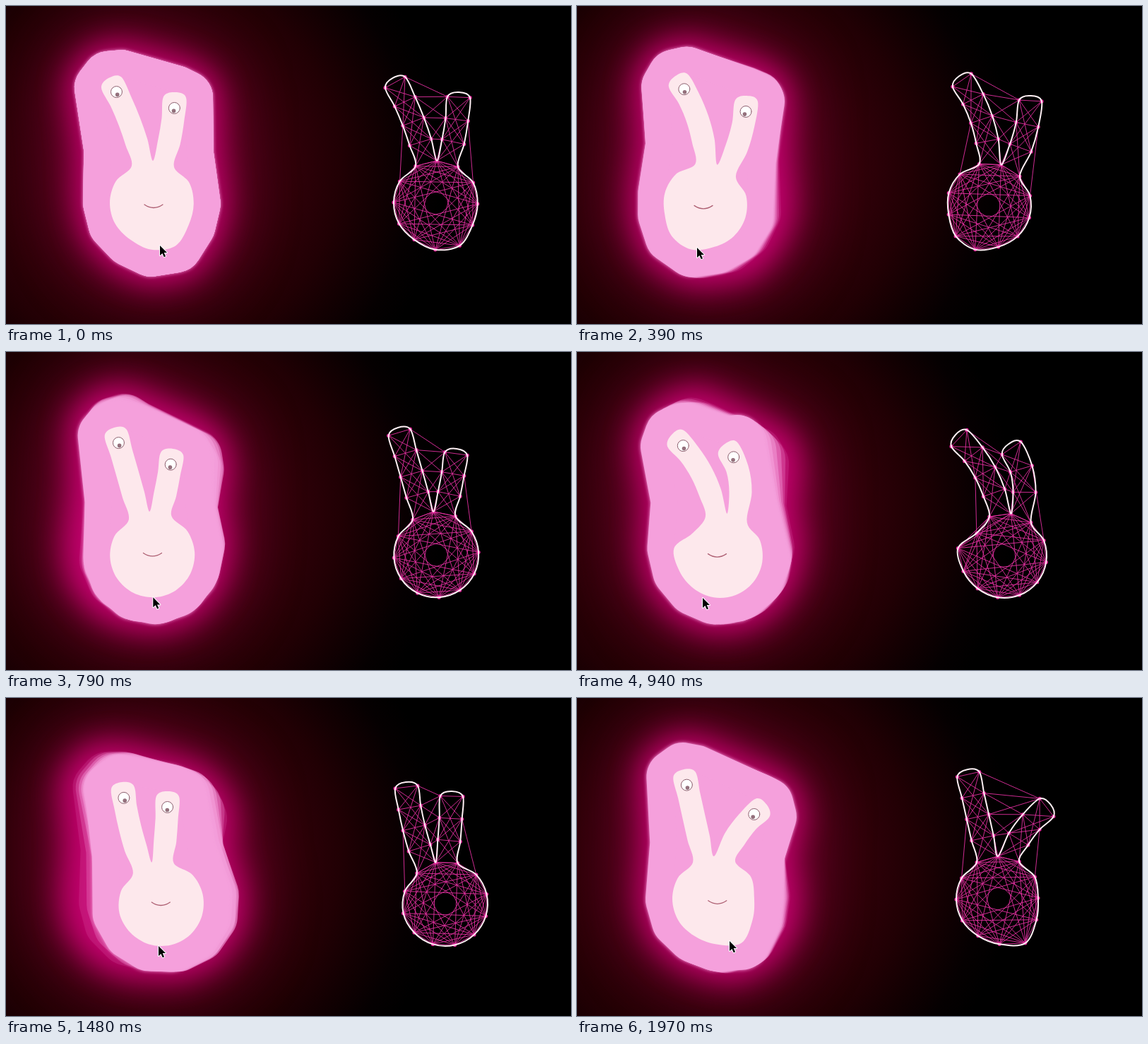
These frames come from a looping animation (800 by 450 pixels, 2 s). An HTML page with a canvas:

```html
<!DOCTYPE html>
<html lang="en">
<head>
<meta charset="utf-8">
<title>Soft body</title>
<style>
  html, body { margin: 0; width: 100%; height: 100%; overflow: hidden; background: #000; }
  canvas { display: block; width: 800px; height: 450px; }
</style>
</head>
<body>
<canvas id="stage" width="800" height="450"></canvas>
<script>
const ctx = document.getElementById('stage').getContext('2d');
const LOOP = 2000;
const MESH_X = 402;   // distance from the creature to its mesh
const RADIUS = 60;
const PINK = '#f5a0dc', SKIN = '#fde8ec', MAGENTA = '#c4006f';
const RAD = Math.PI / 180;

// Time, body x y, spin in degrees, sag, left tip x y, right tip x y, pointer x.
const keys = [
  [0, 207, 279, 1, 10, 149, 108, 239, 129, 218],
  [390, 181, 282, 17, 6, 143, 105, 240, 134, 170],
  [640, 206, 286, -13, -2, 168, 105, 262, 153, 234],
  [940, 203, 288, 9, -1, 139, 122, 213, 136, 178],
  [1210, 187, 288, 5, -1, 141, 119, 268, 165, 207],
  [1370, 232, 290, -10, 0, 160, 123, 243, 142, 236],
  [1480, 220, 291, -13, 0, 165, 126, 229, 139, 216],
  [1970, 195, 284, -1, 12, 152, 108, 263, 155, 216]
];

const mix = (a, b, k) => [a[0] + (b[0] - a[0]) * k, a[1] + (b[1] - a[1]) * k];
// Point at a distance and a clockwise angle from straight up.
const polar = ([x, y], angle, r) => [x + r * Math.sin(angle), y - r * Math.cos(angle)];
const heading = (a, b) => Math.atan2(b[0] - a[0], a[1] - b[1]);
const turn = a => Math.atan2(Math.sin(a), Math.cos(a));
const bell = (a, width) => Math.exp(-((turn(a) / width) ** 2));

function slope(i, n) {
  const a = keys[Math.max(0, i - 1)], b = keys[Math.min(keys.length - 1, i + 1)];
  return (b[n] - a[n]) / (b[0] - a[0]);
}

// Hermite curve through the key poses.
function sample(time) {
  const t = Math.max(0, Math.min(1970, time));
  let i = 0;
  while (i < keys.length - 2 && t >= keys[i + 1][0]) i++;
  const a = keys[i], b = keys[i + 1], d = b[0] - a[0], u = (t - a[0]) / d;
  const u2 = u * u, u3 = u2 * u;
  return a.map((p, n) =>
    p * (2 * u3 - 3 * u2 + 1) + b[n] * (3 * u2 - 2 * u3) +
    d * (slope(i, n) * (u3 - 2 * u2 + u) + slope(i + 1, n) * (u3 - u2)));
}

// Twelve nodes in a circle, pulled out on one side and dented above a sideways pull.
function bodyRing(center, spin, [px, py]) {
  const amount = Math.hypot(px, py) || 1e-6;
  const toward = Math.atan2(px, -py);
  const dent = 1.5 * px * px / amount;
  return Array.from({ length: 12 }, (_, i) => {
    const a = spin + i * 30 * RAD;
    const r = RADIUS + amount * bell(a - toward, 25 * RAD) - dent * bell(a - toward * 0.62, 20 * RAD);
    return polar(center, a, r);
  });
}

// A tube that leaves the body in one direction and bends on past the tip's bearing.
function stalk(rootL, rootR, tip, lean, joints) {
  const root = mix(rootL, rootR, 0.5);
  const bearing = heading(root, tip);
  const aim = bearing + 0.8 * (bearing - lean);
  const knee = polar(tip, aim, -Math.hypot(tip[0] - root[0], tip[1] - root[1]) / 2);
  const left = [rootL], right = [rootR];
  for (let i = 1; i <= joints; i++) {
    const u = i / joints, a = mix(root, knee, u), b = mix(knee, tip, u);
    const mid = mix(a, b, u), side = heading(a, b) + 90 * RAD;
    left.push(polar(mid, side, -16));
    right.push(polar(mid, side, 16));
  }
  return { left, right, cap: polar(tip, aim, 7), eye: polar(tip, aim, -15.5) };
}

function poseAt(time) {
  const [, x, y, degrees, sag, lx, ly, rx, ry, pointerX] = sample(time);
  const spin = degrees * RAD;
  const pull = [(pointerX - x) * 0.3, sag];
  const ring = bodyRing([x, y], spin, pull);
  const left = stalk(ring[11], ring[0], [lx, ly], 0.8 * spin - 12 * RAD, 4);
  const right = stalk(ring[0], ring[1], [rx, ry], 0.8 * spin + 18 * RAD, 3);
  return {
    ring, left, right,
    mouth: [x + pull[0] * 0.6, y + sag * 0.4 - 2],
    pointer: [pointerX, y + RADIUS]
  };
}

function outline({ ring, left, right }) {
  return [...left.left, left.cap, ...[...left.right].reverse(),
    ...right.left.slice(1), right.cap, ...[...right.right].reverse(), ...ring.slice(2, 11)];
}

// Closed smooth curve through the points.
function smooth(points) {
  const path = new Path2D(), n = points.length, at = i => points[(i + n) % n];
  path.moveTo(...points[0]);
  points.forEach((b, i) => {
    const a = at(i - 1), c = at(i + 1), d = at(i + 2);
    path.bezierCurveTo(
      b[0] + (c[0] - a[0]) / 6, b[1] + (c[1] - a[1]) / 6,
      c[0] - (d[0] - b[0]) / 6, c[1] - (d[1] - b[1]) / 6, ...c);
  });
  path.closePath();
  return path;
}

// Rough hull with its waist pulled in a little.
function hull({ ring, left, right }) {
  const tipL = left.left[4], tipR = right.right[3];
  const points = [tipL, left.cap, left.right[4], right.cap, tipR,
    mix(mix(tipR, ring[3], 0.5), ring[1], 0.2), ...ring.slice(3, 10),
    mix(mix(ring[9], tipL, 0.5), ring[11], 0.2)];
  const path = new Path2D();
  points.forEach(p => path.lineTo(...p));
  path.closePath();
  return path;
}

function background() {
  const g = ctx.createRadialGradient(200, 225, 0, 200, 225, 420);
  [[0, '#48001a'], [0.3, '#3e0010'], [0.48, '#300009'], [0.65, '#210004'],
    [0.77, '#130002'], [0.9, '#050001'], [1, '#000']].forEach(s => g.addColorStop(...s));
  ctx.fillStyle = g;
  ctx.fillRect(0, 0, 800, 450);
}

// Draws only the shadow: the path itself lies off stage.
function halo(path, width, blur, color) {
  ctx.save();
  ctx.translate(-2000, 0);
  ctx.shadowColor = color;
  ctx.shadowBlur = blur;
  ctx.shadowOffsetX = 2000;
  ctx.lineWidth = width;
  ctx.strokeStyle = '#000';
  ctx.stroke(path);
  ctx.restore();
}

function glow(time) {
  const trail = Array.from({ length: 11 }, (_, k) => hull(poseAt(time - 30 * k)));
  const swept = new Path2D();
  trail.forEach(path => swept.addPath(path));
  halo(swept, 118, 84, 'rgba(145,0,66,.8)');
  halo(swept, 94, 40, MAGENTA);
  ctx.save();
  ctx.lineWidth = 76;
  ctx.fillStyle = ctx.strokeStyle = ctx.shadowColor = PINK;
  for (let k = 7; k >= 0; k--) {
    ctx.globalAlpha = 1 - k / 8;
    ctx.shadowBlur = k ? 0 : 5;
    ctx.stroke(trail[k]);
    ctx.fill(trail[k]);
  }
  ctx.restore();
}

function line(path, color, width) {
  ctx.strokeStyle = color;
  ctx.lineWidth = width;
  ctx.stroke(path);
}

function disc([x, y], r, fill) {
  const path = new Path2D();
  path.arc(x, y, r, 0, 7);
  ctx.fillStyle = fill;
  ctx.fill(path);
  return path;
}

function creature(pose) {
  const { mouth, left, right } = pose;
  ctx.fillStyle = SKIN;
  ctx.fill(smooth(outline(pose)));
  for (const { eye } of [left, right]) {
    line(disc(eye, 8, '#fff'), '#8c5f6e', 1);
    disc(polar(eye, heading(eye, mouth), 4), 2.8, '#94707c');
  }
  const [x, y] = mouth, smile = new Path2D();
  smile.moveTo(x - 13, y);
  smile.quadraticCurveTo(x, y + 9, x + 13, y);
  line(smile, '#ad5f72', 1.3);
}

function mesh(pose) {
  const { ring, left, right } = pose, springs = new Path2D();
  const link = (a, b) => {
    springs.moveTo(...a);
    springs.lineTo(...b);
  };
  const brace = (as, bs, reach) => as.forEach((a, i) => bs.forEach((b, j) => {
    if (Math.abs(i - j) <= reach) link(a, b);
  }));
  ring.forEach((a, i) => {
    for (let step = 1; step < 6; step++) link(a, ring[(i + step) % 12]);
  });
  brace(left.left, left.right, 2);
  brace(right.left, right.right, 2);
  brace(left.right, right.left, 1);
  link(left.left[2], ring[10]);
  link(right.right[2], ring[2]);

  ctx.save();
  ctx.translate(MESH_X, 0);
  line(springs, 'rgba(226,48,160,.9)', 1);
  const nodes = outline(pose);
  nodes.filter(p => p !== left.cap && p !== right.cap).forEach(p => disc(p, 2.6, '#e0269a'));
  line(smooth(nodes), '#fff0f4', 2);
  ctx.restore();
}

const arrow = new Path2D('M0 0V14L3.4 11L5.8 16.2L8 15.2L5.7 10.1H10Z');
function pointer({ pointer: [x, y] }) {
  ctx.save();
  ctx.translate(x, y);
  line(arrow, '#fff', 2);
  ctx.fillStyle = '#000';
  ctx.fill(arrow);
  ctx.restore();
}

// 30 ms ticks, with one of 40 ms in each second.
function tick(ms) {
  const s = ms % 1000;
  const held = s < 520 ? Math.min(480, Math.floor(s / 30) * 30) : Math.floor((s - 10) / 30) * 30 + 10;
  return ms - s + held;
}

ctx.lineJoin = ctx.lineCap = 'round';
const start = performance.now();
let shown = -1;
function draw() {
  const time = tick((performance.now() - start) % LOOP);
  if (time !== shown) {
    shown = time;
    const pose = poseAt(time);
    background();
    glow(time);
    creature(pose);
    mesh(pose);
    pointer(pose);
  }
  requestAnimationFrame(draw);
}
draw();
</script>
</body>
</html>
```
